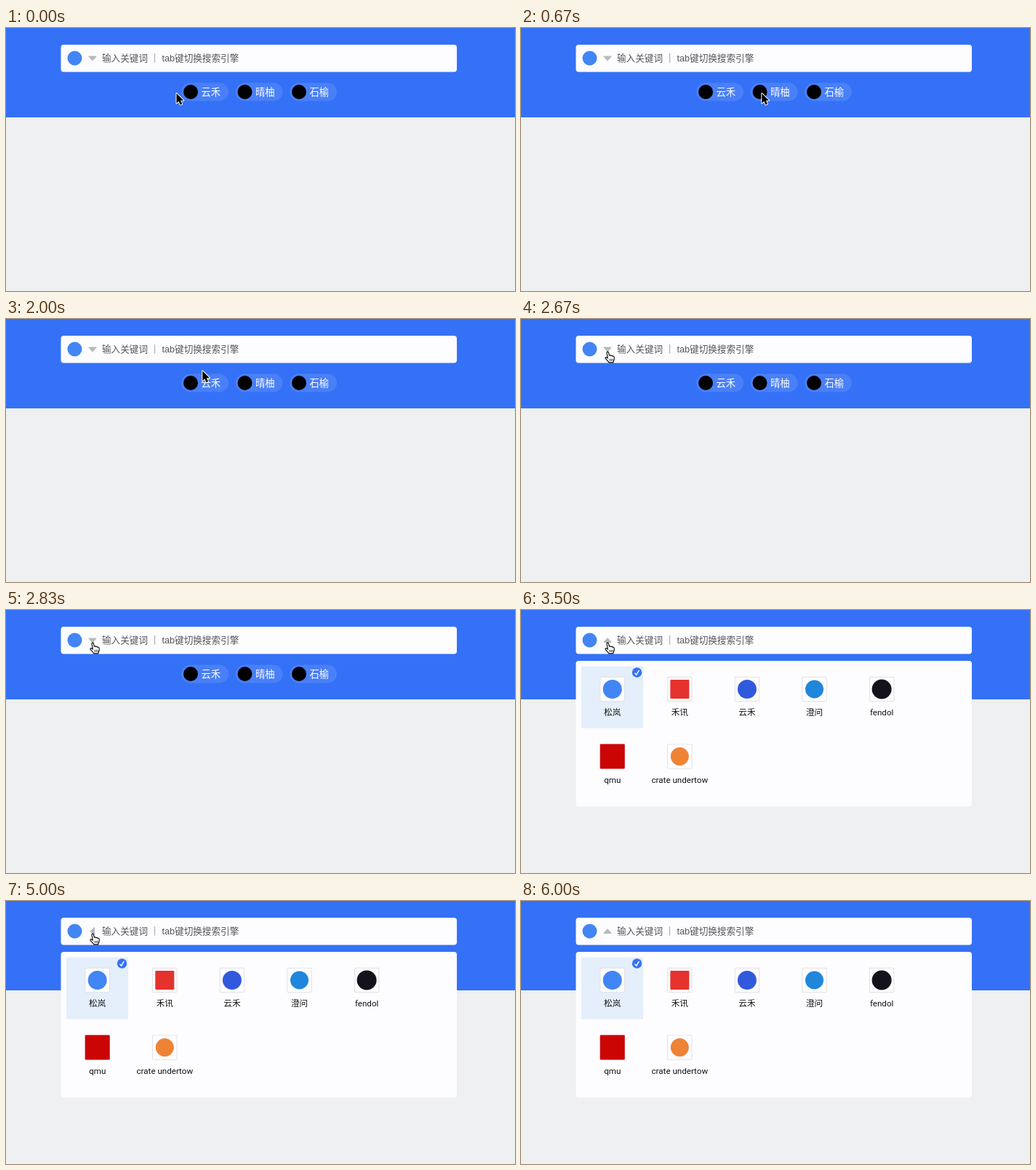
An HTML page with a canvas for the animation above (6170 ms loop, 700 px wide and 362 px high).

```html
<!DOCTYPE html>
<html lang="zh-CN">
<head>
<meta charset="utf-8">
<title>Search bar</title>
<style>
  html, body { margin: 0; width: 100%; height: 100%; overflow: hidden; background: #eef0f1; }
  canvas { display: block; width: 700px; height: 362px; }
</style>
</head>
<body>
<canvas id="stage"></canvas>
<script>
const W = 700, H = 362, LOOP = 6170, FPS = 6, LAST = 36;
const BLUE = '#3471f6', PAPER = '#fdfcff';
const UI_FONT = '"Liberation Sans", "Noto Sans CJK SC", "Noto Sans CJK", sans-serif';
const LABEL_FONT = 'Roboto, "Noto Sans CJK SC", "Noto Sans CJK", sans-serif';

const canvas = document.getElementById('stage');
const ctx = canvas.getContext('2d');
const dpr = window.devicePixelRatio || 1;
canvas.width = W * dpr;
canvas.height = H * dpr;

const chips = ['云禾', '晴柚', '石榆'];
const engines = [
  { name: '松岚', color: '#4285f4', size: 26, round: true },
  { name: '禾讯', color: '#e5322d', size: 26 },
  { name: '云禾', color: '#3159dc', size: 26, round: true },
  { name: '澄问', color: '#1f86dc', size: 25, round: true },
  { name: 'fendol', color: '#14121a', size: 27, round: true },
  { name: 'qmu', color: '#cb0404', size: 34 },
  { name: 'crate undertow', color: '#ee8336', size: 25, round: true }
];

// Pointer path: step, x, y
const path = [[0, 234.5, 90], [7, 394, 90], [9, 422.5, 98], [10, 422, 98], [14, 118.5, 45]];

const arrow = new Path2D('M0 0V13.6L3.1 10.7L5.2 15.7L7.7 14.6L5.6 9.8H9.8Z');
const hand = new Path2D('M2.6 2.2C2.3 .6 4.6 .2 5 1.8L6 6C6.6 5.2 8 5.3 8.3 6.3C9.2 5.6 10.2 6 10.5 7' +
  'C11.8 6.4 12.8 7.2 12.8 8.6V11.2C12.6 13 11.4 13.8 11.3 15.6H5.4C4.8 13.6 2.6 12.2 1 10.4' +
  'C-.2 8.8 1.2 7.8 2.6 8.8L3.9 9.8Z');
const fingers = new Path2D('M6.8 10.5V13.5M8.8 10.5V13.5M10.7 10.5V13.5');

function box(x, y, w, h, r, fill) {
  ctx.beginPath();
  ctx.roundRect(x, y, w, h, r);
  ctx.fillStyle = fill;
  ctx.fill();
}

function disc(x, y, r, fill) {
  ctx.beginPath();
  ctx.arc(x, y, r, 0, Math.PI * 2);
  ctx.fillStyle = fill;
  ctx.fill();
}

function text(str, x, y, font, fill, align = 'left') {
  ctx.font = font;
  ctx.textAlign = align;
  ctx.fillStyle = fill;
  ctx.fillText(str, x, y);
}

function triangle(angle) {
  ctx.save();
  ctx.translate(119, 41.7);
  ctx.rotate(angle);
  ctx.beginPath();
  ctx.moveTo(-5, -2.6);
  ctx.lineTo(5, -2.6);
  ctx.lineTo(0, 2.8);
  ctx.closePath();
  ctx.fillStyle = ctx.strokeStyle = '#b9b9bb';
  ctx.lineJoin = 'round';
  ctx.lineWidth = 1.2;
  ctx.fill();
  ctx.stroke();
  ctx.restore();
}

function searchBar(angle) {
  box(75.5, 23, 544.5, 37.5, 4, PAPER);
  disc(94.5, 41.5, 10, '#4285f4');
  triangle(angle);
  text('输入关键词 ｜ tab键切换搜索引擎', 132, 46, '12.6px ' + UI_FONT, '#555559');
}

function drawChip(name, i) {
  const x = 241 + i * 74.5;
  box(x, 75.5, 65, 25, 12.5, '#4a80f7');
  disc(x + 13, 88, 10, '#000');
  text(name, x + 27.5, 93, '500 13.3px ' + UI_FONT, '#fff');
}

function drawEngine(engine, i) {
  const x = 125.7 + (i % 5) * 92.6;
  const y = 109 + Math.floor(i / 5) * 92.6;
  const s = engine.size;
  box(x - 17.2, y - 17.2, 34.4, 34.4, 2, '#dfdfe6');
  box(x - 16.3, y - 16.3, 32.6, 32.6, 1.5, PAPER);
  if (engine.round) disc(x, y, s / 2, engine.color);
  else box(x - s / 2, y - s / 2, s, s, 1, engine.color);
  text(engine.name, x, y + 36.3, '11.6px ' + LABEL_FONT, '#111', 'center');
}

function panel() {
  box(75.5, 70, 544.5, 200.5, 4, PAPER);
  box(83, 77.5, 85, 85, 0, '#e4effb');
  disc(159.5, 86, 6.7, BLUE);
  ctx.beginPath();
  ctx.moveTo(156.4, 86.6);
  ctx.lineTo(158.6, 89.2);
  ctx.lineTo(162.4, 82.8);
  ctx.strokeStyle = '#fff';
  ctx.lineWidth = 1.4;
  ctx.stroke();
  engines.forEach(drawEngine);
}

function pointer(step) {
  if (step >= LAST) return;
  let [, x, y] = path[path.length - 1];
  for (let i = 1; i < path.length; i++) {
    const [s0, x0, y0] = path[i - 1], [s1, x1, y1] = path[i];
    if (step < s0 || step > s1) continue;
    const u = (step - s0) / (s1 - s0), k = u * u * (3 - 2 * u);
    x = x0 + (x1 - x0) * k;
    y = y0 + (y1 - y0) * k;
    break;
  }
  ctx.save();
  ctx.lineJoin = 'round';
  if (step >= 14) {
    ctx.translate(x - 3.1, y - 0.7);
    ctx.fillStyle = '#fff';
    ctx.strokeStyle = '#000';
    ctx.lineWidth = 1.1;
    ctx.fill(hand);
    ctx.stroke(hand);
    ctx.lineWidth = 0.8;
    ctx.stroke(fingers);
  } else {
    ctx.translate(x, y);
    ctx.strokeStyle = '#fff';
    ctx.lineWidth = 2;
    ctx.stroke(arrow);
    ctx.fillStyle = '#000';
    ctx.fill(arrow);
  }
  ctx.restore();
}

function draw(step) {
  const open = (step >= 18 && step < 23) || step >= 30;
  const turning = step === 18 || step === 23 || step === 30;
  const angle = turning ? Math.PI / 2 : open ? Math.PI : 0;

  ctx.setTransform(dpr, 0, 0, dpr, 0, 0);
  box(0, 0, W, H, 0, '#eef0f1');
  box(0, 0, W, 123, 0, BLUE);
  searchBar(angle);
  if (open) panel();
  else chips.forEach(drawChip);
  pointer(step);
}

const start = performance.now();
function tick() {
  const t = (performance.now() - start) % LOOP;
  draw(Math.min(LAST, Math.floor((t + 4) * FPS / 1000)));
  requestAnimationFrame(tick);
}
tick();
</script>
</body>
</html>
```
